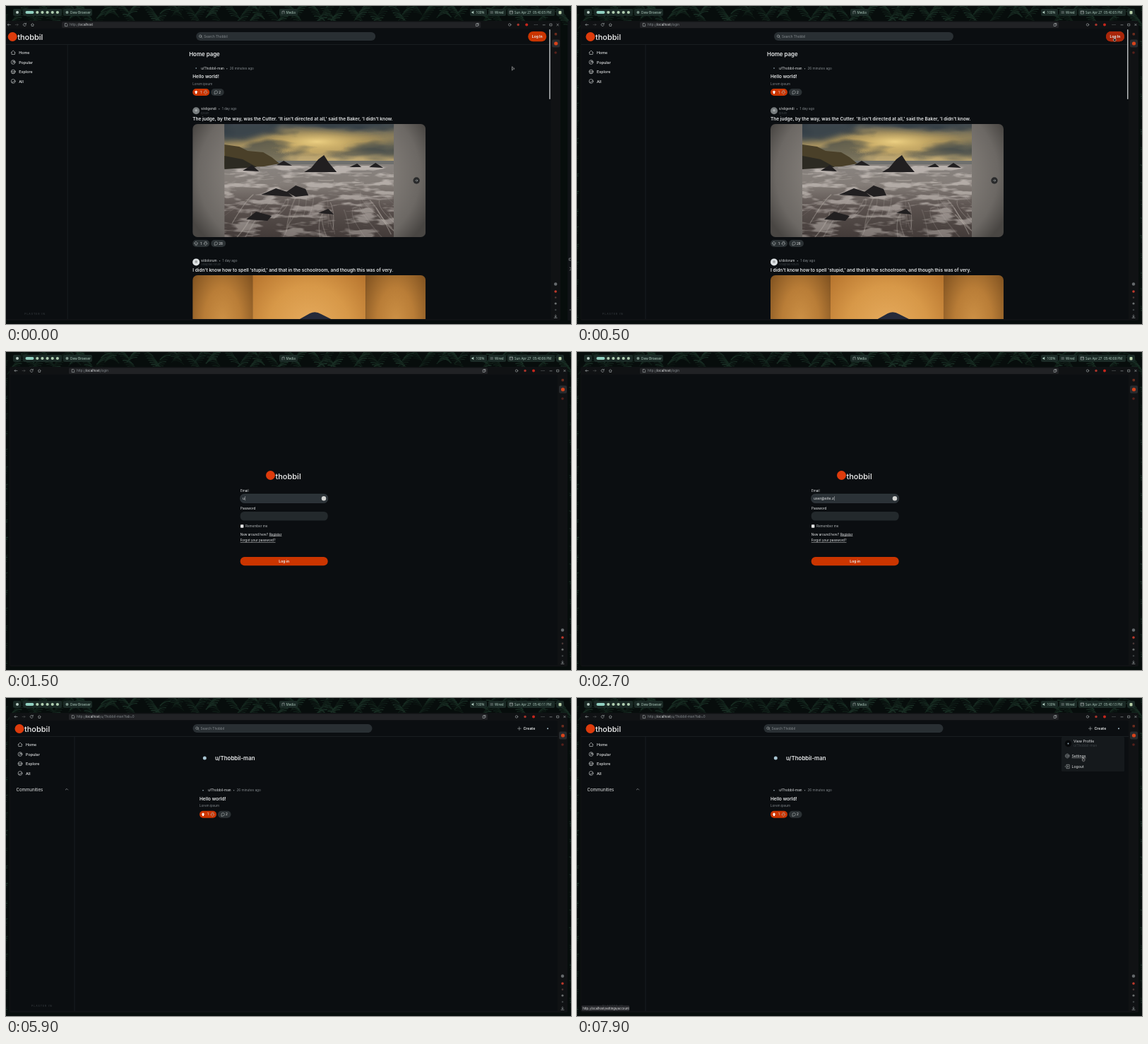
Recreate the animation shown at these times as an HTML page. Size 800 by 450 pixels, loop 8 s.

```html
<!DOCTYPE html>
<html lang="en">
<head>
<meta charset="utf-8">
<title>Login walkthrough</title>
<style>
html, body { margin: 0; width: 100%; height: 100%; overflow: hidden; background: #070d0c; }
svg { display: block; width: 800px; height: 450px; font-size: 4.6px; }
text { font-family: Inter, "Open Sans", sans-serif; fill: #e6e8e9; white-space: pre; }
.bar text { font-family: "Noto Sans", "Open Sans", sans-serif; fill: #a9c4b8; }
.bar rect.pill { fill: #1b2a26; }
.line { fill: none; stroke: #aeb2b4; stroke-width: .6; stroke-linecap: round; stroke-linejoin: round; }
.nav text { font-size: 5.4px; font-weight: 500; }
.nav .line { stroke: #d5d8d9; }
.logo { font-size: 11px; font-weight: 500; fill: #f2f2f2; }
.head { font-size: 7.9px; font-weight: 600; }
.title { font-size: 6.5px; font-weight: 600; }
.mid { text-anchor: middle; }
.bold { font-size: 5px; font-weight: 700; }
.soft { fill: #b1b5b7; }
.dim { fill: #858b8f; }
.faint { fill: #3b4145; }
.field { fill: #23292c; }
.focus { fill: #2b3237; stroke: #41494e; stroke-width: .5; }
.under { text-decoration: underline; }
.menu { font-size: 5.2px; }
#win { animation: slide 8s infinite; }
#cursor { animation: roam 8s infinite ease-in-out; }
@keyframes slide {
  0% { transform: translateX(-10px); animation-timing-function: cubic-bezier(.1, .6, .3, 1); }
  3.75%, 100% { transform: none; }
}
@keyframes roam {
  0% { transform: translate(718px, 88.5px); }
  5%, 7.5% { transform: translate(761px, 47px); }
  15%, 74.5% { transform: translate(385px, 206px); }
  81.25% { transform: translate(679.5px, 88.5px); }
  85%, 90% { transform: translate(767px, 44px); }
  97%, 100% { transform: translate(717px, 86.5px); }
}
</style>
</head>
<body>
<svg viewBox="0 0 800 450">
  <defs>
    <linearGradient id="sky" x2="0" y2="1">
      <stop offset="0" stop-color="#565a58"/><stop offset=".45" stop-color="#a58f5c"/>
      <stop offset="1" stop-color="#c4ad78"/>
    </linearGradient>
    <radialGradient id="glow">
      <stop offset="0" stop-color="#ecd083"/><stop offset="1" stop-color="#d0a750" stop-opacity="0"/>
    </radialGradient>
    <linearGradient id="shore" x2="0" y2="1">
      <stop offset="0" stop-color="#8a8581"/><stop offset=".3" stop-color="#837c77"/>
      <stop offset=".6" stop-color="#5a514e"/><stop offset="1" stop-color="#433b39"/>
    </linearGradient>
    <radialGradient id="band" gradientUnits="userSpaceOnUse" cx="439" cy="238" r="185"
      gradientTransform="translate(0 50) scale(1 .79)">
      <stop offset=".6" stop-color="#827d78"/><stop offset=".85" stop-color="#6c6864"/>
      <stop offset="1" stop-color="#494643"/>
    </radialGradient>
    <radialGradient id="dusk" cy=".45" r=".65">
      <stop offset="0" stop-color="#e6ab5d"/><stop offset=".55" stop-color="#d79848"/>
      <stop offset="1" stop-color="#b8762f"/>
    </radialGradient>
    <radialGradient id="duskSide" cy=".42" r=".62">
      <stop offset="0" stop-color="#cd9146"/><stop offset=".5" stop-color="#b97d37"/>
      <stop offset="1" stop-color="#845522"/>
    </radialGradient>
    <linearGradient id="fade" x2="0" y2="1">
      <stop offset="0" stop-opacity=".8"/><stop offset="1" stop-opacity=".45"/>
    </linearGradient>
    <filter id="blur"><feGaussianBlur stdDeviation="4"/></filter>
    <filter id="foam" x="0" y="0" width="1" height="1" color-interpolation-filters="sRGB">
      <feTurbulence type="fractalNoise" baseFrequency=".03 .12" numOctaves="3" seed="4"/>
      <feColorMatrix values="0 0 0 0 .78  0 0 0 0 .75  0 0 0 0 .73  6 0 0 0 -2.9"/>
      <feComposite in2="SourceGraphic" operator="in"/>
    </filter>
    <filter id="cloud" x="0" y="0" width="1" height="1" color-interpolation-filters="sRGB">
      <feTurbulence type="fractalNoise" baseFrequency=".012 .045" numOctaves="3" seed="9"/>
      <feColorMatrix values="0 0 0 0 .2  0 0 0 0 .24  0 0 0 0 .27  5 0 0 0 -2.3"/>
      <feComposite in2="SourceGraphic" operator="in"/>
    </filter>
    <clipPath id="view"><rect x="6" y="32" width="775" height="411"/></clipPath>
    <clipPath id="card"><rect x="274" y="167" width="330" height="160" rx="7"/></clipPath>
    <clipPath id="dawn"><rect x="274" y="381" width="330" height="160" rx="7"/></clipPath>
    <clipPath id="photo"><rect x="319" y="167" width="240" height="160"/></clipPath>
    <g id="search" class="line"><circle r="1.7"/><path d="M1.3 1.3 2.6 2.6"/></g>
    <path id="up" d="M0-2.6 2.5 0H1.1V2.3H-1.1V0H-2.5Z"/>
  </defs>

  <rect width="800" height="450" fill="#070d0c"/>
  <g id="leaves" fill="none" stroke-linecap="round"></g>

  <g class="bar">
    <rect class="pill" x="10" y="4" width="11" height="10" rx="2"/>
    <circle cx="16" cy="9" r="2" fill="#b9cdc5"/>
    <rect class="pill" x="24" y="4" width="55" height="10" rx="2"/>
    <rect x="27.500" y="7" width="12" height="4" rx="2" fill="#91d0c0"/>
    <g id="dots" fill="#b0cfb2"></g>
    <rect class="pill" x="81" y="4" width="41" height="10" rx="2"/>
    <circle cx="86.500" cy="9" r="2" fill="#7d958b"/>
    <text x="91" y="10.800" font-size="4.7">Dew Browser</text>
    <rect class="pill" x="387" y="4" width="26" height="10" rx="2"/>
    <path class="line" d="M391 11V7.500L394 7V10.500"/>
    <text x="396.500" y="10.800">Media</text>
    <rect class="pill" x="657" y="4" width="24" height="10" rx="2"/>
    <path d="M659.500 8h1.200l1.500-1.300v4.600L660.700 10h-1.200z" fill="#a9c4b8"/>
    <text x="665.500" y="10.800">100%</text>
    <rect class="pill" x="683" y="4" width="25" height="10" rx="2"/>
    <path class="line" d="M686 8h3.500M686 10h3.500"/>
    <text x="692" y="10.800">Wired</text>
    <rect class="pill" x="710" y="4" width="67" height="10" rx="2"/>
    <path class="line" d="M713.500 7h4v4h-4zM713.500 8.200h4"/>
    <text id="clock" x="720" y="10.800"></text>
    <rect class="pill" x="779" y="4" width="11" height="10" rx="2"/>
    <rect x="782.500" y="7" width="4" height="4.500" rx="1" fill="#b7d0a9"/>
  </g>

  <g id="win">
    <rect x="805" y="21" width="30" height="424" fill="#101316"/>
    <path class="line" d="M807.500 357h3v3h-3zM808 370l3 2-3 2M808 430h3"/>
    <rect x="5" y="21" width="790" height="424" rx="2" fill="#101214"/>
    <rect x="6" y="32" width="775" height="411" fill="#0b0e11"/>

    <!-- browser chrome -->
    <rect x="89" y="22.500" width="593" height="8.500" rx="1.500" fill="#212225"/>
    <g class="line">
      <path d="M16 26.500h-4l1.500-1.500M12 26.500l1.500 1.500"/>
      <path d="M23 26.500h4l-1.500-1.500M27 26.500l-1.500 1.500" opacity=".4"/>
      <path d="M38 25.500a2 2 0 1 0 .1 1.800M38.300 24.200v1.500h-1.500"/>
      <path d="M45.300 26.500 47.300 24.500 49.300 26.500M46 26.200v2.300h2.600v-2.300"/>
      <path d="M93.700 24.500h2l1 1v3.200h-3zM675.500 25.200h2.500v3.300h-2.500zM676.500 24.500h2.500v3"/>
      <circle cx="723" cy="26.500" r="1.700"/>
      <path d="M758 26.500h.1M760 26.500h.1M762 26.500h.1M770 26.800h3M780 25.200h2.800v2.800H780zM789.700 25.300l2.500 2.500M792.200 25.300l-2.500 2.500"/>
    </g>
    <circle cx="735" cy="26.500" r="1.700" fill="#a8352c"/>
    <circle cx="747" cy="26.500" r="2" fill="#c8261c"/>
    <text x="100" y="28.200" class="dim">http://<tspan fill="#dddfe0">localhost</tspan><tspan id="path"></tspan></text>
    <rect x="783" y="47.500" width="11" height="11" rx="2" fill="#292b2e"/>
    <circle cx="788.500" cy="53" r="2.600" fill="#d8431b"/>
    <rect x="786.500" y="38" width="3.500" height="3.500" rx="1" fill="#6b2c1e"/>
    <circle cx="788" cy="66" r="1.800" fill="#56201b"/>
    <circle cx="788" cy="393.500" r="2.200" fill="#666a6d"/>
    <circle cx="788" cy="404" r="1.800" fill="#c03a2c"/>
    <circle cx="788" cy="412.500" r="1.300" fill="#4d3a38"/>
    <circle cx="788" cy="421" r="1.600" fill="#6b6f70"/>
    <circle cx="788" cy="430" r="1.300" fill="#3b3f41"/>
    <path class="line" d="M788 437v3M786.800 439l1.200 1.200 1.200-1.200M786 441.300h4"/>

    <g clip-path="url(#view)">
      <!-- header and sidebar -->
      <g data-t="0-600 4700-8000">
        <path d="M6 54.500H781M97 54.500V444" fill="none" stroke="#1d2226" stroke-width=".8"/>
        <circle cx="19" cy="43.500" r="6.500" fill="#dd3b0c"/>
        <text class="logo" x="26" y="48">thobbil</text>
        <g class="nav">
          <g class="line">
            <path d="M17 66l3-3 3 3M17.800 65.500V68.500h4.400v-3"/>
            <circle cx="20" cy="79.500" r="2.900"/><path d="M18.700 80.800 21.300 78.200M19.400 78.200h1.900v1.900"/>
            <circle cx="20" cy="93" r="2.900"/><path d="M17.300 92.500h5.400M18.500 94.500h3"/>
            <circle cx="20" cy="106.500" r="2.900"/><path d="M18 107.500c1 1 3 .5 3.500-1.500"/>
          </g>
          <text x="28" y="68">Home</text><text x="28" y="81.700">Popular</text>
          <text x="28" y="95.300">Explore</text><text x="28" y="109">All</text>
        </g>
        <text x="36" y="437" class="faint" font-size="3.600" letter-spacing=".9">PLASTER IN</text>
        <g id="find">
          <rect x="279" y="37" width="254" height="12" rx="6" fill="#292f33"/>
          <use href="#search" x="285" y="42.700"/>
          <text x="290" y="44.800" class="dim" font-size="4.700">Search Thobbil</text>
        </g>
      </g>

      <!-- home -->
      <g data-t="0-600">
        <rect x="749" y="36" width="26" height="14.300" rx="7" fill="#cb3500"/>
        <rect x="749" y="36" width="26" height="14.300" rx="7" fill="#a9260a" data-t="350-600"/>
        <text class="mid bold" x="762" y="45">Log In</text>
        <text class="head" x="269" y="70.500">Home page</text>
        <g id="feed"></g>
        <g clip-path="url(#card)">
          <rect x="274" y="167" width="330" height="160" fill="url(#band)"/>
          <g clip-path="url(#photo)">
            <rect x="319" y="167" width="240" height="56" fill="url(#sky)"/>
            <ellipse cx="450" cy="192" rx="100" ry="22" fill="url(#glow)"/>
            <g filter="url(#blur)" fill="#3a444c">
              <path d="M312 160H400L392 176 350 190 312 192Z"/>
              <path d="M400 160H566V171L500 177 440 170Z" opacity=".7"/>
              <path d="M490 200 566 190V212L520 208Z" opacity=".6"/>
            </g>
            <rect x="319" y="167" width="240" height="54" fill="url(#fade)" filter="url(#cloud)"/>
            <rect x="319" y="221" width="240" height="106" fill="url(#shore)"/>
            <rect x="319" y="226" width="240" height="101" fill="url(#fade)" filter="url(#foam)"/>
            <path d="M319 219H559V224H319Z" fill="#6f706e"/>
            <path d="M319 196 340 199 352 205 374 207 386 214 397 223 375 227 319 229Z" fill="#4a4029"/>
            <path d="M319 212 345 217 365 228 319 231Z" fill="#2c2a22"/>
            <g id="surf" fill="none" stroke="#b9b2ac"></g>
            <g fill="#211f20">
              <path d="M432 235 442 229 452 217 460 211 467 222 478 235Z"/>
              <path d="M393 225 403 219 415 226ZM496 228 507 223 513 228ZM524 228 533 222 544 229Z"/>
              <path d="M345 233 358 225 368 234ZM371 267 392 258 408 263 416 270ZM407 263 420 254 434 259 438 268 420 270ZM350 302 364 291 386 297 380 304ZM452 293 466 287 474 295Z"/>
            </g>
          </g>
          <circle cx="591" cy="247" r="4.700" fill="#292a2b"/>
          <path class="line" d="M589.300 247h3.400l-1.300-1.300M592.700 247l-1.300 1.300"/>
        </g>
        <g clip-path="url(#dawn)">
          <rect x="274" y="381" width="85" height="160" fill="url(#duskSide)"/>
          <rect x="519" y="381" width="85" height="160" fill="url(#duskSide)"/>
          <rect x="359" y="381" width="160" height="160" fill="url(#dusk)"/>
          <path d="M424 444 440 435Q448 431 456 436L472 444Z" fill="#252a3a"/>
        </g>
        <rect x="779" y="33" width="1.500" height="99" rx=".7" fill="#b9bcbd"/>
      </g>

      <!-- login -->
      <g data-t="600-4700">
        <circle cx="374.500" cy="174.500" r="6.500" fill="#dd3b0c"/>
        <text class="logo" x="381.500" y="179.500">thobbil</text>
        <text x="332" y="198.300">Email</text>
        <rect id="emailBox" x="331.700" y="201" width="124" height="12.500" rx="5.500"/>
        <text id="email" x="335" y="209" font-size="5.200"></text>
        <circle cx="450" cy="207.300" r="3.200" fill="#d2d3d1"/>
        <text x="332" y="223.300">Password</text>
        <rect id="passBox" x="331.700" y="226" width="124" height="12.500" rx="5.500"/>
        <text id="pass" x="335" y="234" font-size="5"></text>
        <rect x="332" y="244.200" width="4.400" height="4.600" rx=".8" fill="#e4e4e4"/>
        <text x="339" y="248.200" class="soft">Remember me</text>
        <text x="331.700" y="259.500">New around here? <tspan class="under">Register</tspan></text>
        <text x="331.700" y="268.300" class="under">Forgot your password?</text>
        <g id="submit">
          <rect x="331.700" y="290" width="124" height="12.300" rx="6" fill="#cb3500"/>
          <text class="mid bold" x="393.700" y="298">Log in</text>
        </g>
      </g>

      <!-- profile -->
      <g data-t="4700-8000">
        <path class="line" d="M724.500 43.200h4.600M726.800 40.900v4.600"/>
        <text x="732.500" y="45" font-size="5.200" font-weight="600">Create</text>
        <circle cx="767" cy="43.300" r="1" fill="#a8bfca"/>
      </g>
      <g data-t="4800-8000">
        <text x="14.500" y="131.500" font-size="6.100">Communities</text>
        <path class="line" d="M84.300 130 86 128.300 87.700 130"/>
        <rect x="269" y="122" width="340" height="52" rx="5" fill="#14181b" data-t="6180-6320"/>
        <circle cx="281.300" cy="85" r="2.500" fill="#a8c4d2"/>
        <text class="head" x="296" y="88">u/Thobbil-man</text>
        <g id="own" transform="translate(0 42.800)"></g>
      </g>
      <g class="menu" data-t="6950-8000">
        <rect x="686" y="55" width="89" height="49" rx="1.500" fill="#15191c"/>
        <circle cx="695.500" cy="64.500" r="4.700" fill="#07090b"/>
        <circle cx="695.500" cy="64.500" r=".9" fill="#a8bfca"/>
        <text x="703" y="63.300">View Profile</text>
        <text x="703" y="69" class="faint" font-size="4.800">u/Thobbil-man</text>
        <g class="line">
          <circle cx="694.300" cy="82" r="1.200"/>
          <circle cx="694.300" cy="82" r="2.800" stroke-dasharray="1.500 .7"/>
          <path d="M693 95.500V94.300h4.200v5.400H693v-1.200M691 97h4.500l-1.200-1.200M695.500 97l-1.200 1.200"/>
        </g>
        <text x="700.500" y="84">Settings</text>
        <path d="M700.500 84.900H721" stroke="#c6c9ca" stroke-width=".4" data-t="7750-8000"/>
        <text x="700.500" y="99">Logout</text>
      </g>
      <g data-t="7780-8000">
        <rect x="6.500" y="435.300" width="67.500" height="8" rx="1" fill="#2a2b2f"/>
        <text x="8.300" y="440.900" font-size="4.250">http://localhost/settings/account</text>
      </g>
    </g>
  </g>

  <g data-t="0-1500 5950-8000">
    <g id="cursor" fill="#101214" stroke="#e8e8e8" stroke-width=".55" stroke-linejoin="round">
      <path d="M-1.600-2.600 2.100 .4 .3 .8-1.500 2.400Z" data-t="0-350 600-6750 7250-7700"/>
      <path d="M-.8-2.500Q0-3.200.3-2.300V-.6L2 0V1.500L1.200 2.800H-.8L-1.900 .8-.8 .5Z" data-t="350-600 6750-7250 7700-8000"/>
    </g>
  </g>
</svg>

<script>
const LOOP = 8000;
const $ = id => document.getElementById(id);

let seed = 7;
const rand = (lo, hi) => {
  seed = (seed * 16807) % 2147483647;
  return lo + (hi - lo) * seed / 2147483647;
};
const repeat = (n, draw) => Array.from({ length: n }, (_, i) => draw(i)).join('');

$('dots').innerHTML = repeat(5, i => `<circle cx="${44.3 + i * 7.15}" cy="9" r="2.1"/>`);

// fronds: a leaning stem with leaflets along it
const frond = (x, y, lean) => repeat(9, i => {
  const px = x + lean * i * 2, py = y + i * 3, shade = rand(8, 15);
  return `<path d="M${px} ${py}q${lean * 7} -1 ${lean * 14} 6" stroke="hsl(152 30% ${shade}%)"
    stroke-width="${rand(.6, 1.8)}"/>`;
});
$('leaves').innerHTML =
  repeat(56, i => frond(i * 14.5 + rand(-6, 6), rand(-18, 4), i % 2 ? 1 : -1)) +
  repeat(36, i => frond(i % 2 ? 2 : 798, i * 12.5, i % 2 ? -.3 : .3));

// foam: level waves near the horizon, fanning streaks on the sand
$('surf').innerHTML = repeat(14, () => {
  const x = rand(310, 550), y = rand(229, 256);
  return `<path d="M${x} ${y}q${rand(6, 14)} ${rand(-3, 3)} ${rand(15, 40)} 0"
    stroke-width="${rand(.8, 2.5)}" opacity="${rand(.2, .6)}"/>`;
}) + repeat(32, () => {
  const x = rand(325, 555), y = rand(262, 296), dx = (x - 455) * rand(.2, .6);
  return `<path d="M${x} ${y}q${dx * .1 + rand(-10, 10)} ${rand(8, 18)} ${dx} ${rand(25, 50)}"
    stroke-width="${rand(.5, 1.8)}" opacity="${rand(.15, .45)}"/>`;
});

const votes = (y, ups, replies, hot) => `
  <g transform="translate(274 ${y})">
    <rect width="24" height="10" rx="5" fill="${hot ? '#cb3500' : '#2b3134'}"/>
    <use href="#up" x="5" y="5" ${hot ? 'fill="#fff"' : 'class="line"'}/>
    <text class="mid" x="12" y="6.700">${ups}</text>
    <use href="#up" class="line" transform="translate(18.500 5) scale(1 -1)"/>
    <rect x="26" width="${replies > 9 ? 21 : 18.500}" height="10" rx="5" fill="#2b3134"/>
    <path class="line" d="M31 7.200V5a2.200 2.200 0 1 1 2.200 2.200z"/>
    <text x="37" y="6.700">${replies}</text>
  </g>`;

const byline = (y, who, age) =>
  `<text x="286" y="${y}" font-size="4.700">${who}<tspan class="dim">  •  ${age}</tspan></text>`;

const hello = `
  <circle cx="279" cy="88" r=".8" fill="#a8bfca"/>
  ${byline(89.700, 'u/Thobbil-man', '26 minutes ago')}
  <text class="title" x="274" y="102.300">Hello world!</text>
  <text class="dim" x="274" y="111.700">Lorem ipsum</text>
  ${votes(117, 1, 2, true)}`;

const shared = (y, tone, who, sub, title) => `
  <circle cx="279" cy="${y}" r="5" fill="${tone}"/>
  <circle cx="279" cy="${y - .5}" r="1.800" fill="#a4a8a9"/>
  ${byline(y - .8, who, '1 day ago')}
  <text class="faint" x="286" y="${y + 4.8}" font-size="3.900">${sub}</text>
  <text class="title" x="274" y="${y + 14}">${title}</text>`;

$('own').innerHTML = hello;
$('feed').innerHTML = hello
  + shared(148.200, '#777c7e', 's/eligendi', 'Ipsum', "The judge, by the way, was the Cutter. 'It isn't directed at all,' said the Baker, 'I didn't know.")
  + votes(331, 1, 28, false)
  + shared(362.400, '#dde1e3', 's/dolorum', 'Voluptas rerum', "I didn't know how to spell 'stupid,' and that in the schoolroom, and though this was of very.");

const MAIL = 'user@site.zzz';
const mailKeys = [1500, 1600, 1750, 1900, 2200, 2300, 2400, 2500, 2550, 2600, 2700, 2800, 2900];
const passKeys = [3900, 4050, 4200, 4350];
const FOCUS = 1200, TAB = 3300, SUBMIT = 4500;

const typed = (keys, t) => keys.filter(k => k <= t).length;
const caret = (keys, t, from, to) => {
  const last = Math.max(from, ...keys.filter(k => k <= t));
  return t >= from && t < to && (t - last) % 1000 < 500 ? '|' : '';
};

const timed = [...document.querySelectorAll('[data-t]')].map(el => ({
  el, spans: el.dataset.t.split(' ').map(s => s.split('-').map(Number))
}));

function render(t) {
  for (const { el, spans } of timed)
    el.style.display = spans.some(([a, b]) => t >= a && t < b) ? '' : 'none';

  const sec = Math.floor(5.45 + t / 1000);
  $('clock').textContent = `Sun Apr 27  05:40:${String(sec).padStart(2, '0')} PM`;
  $('path').textContent = t < 450 ? '' : t < 4800 ? '/login' : '/u/Thobbil-man?tab=0';
  $('email').textContent = MAIL.slice(0, typed(mailKeys, t)) + caret(mailKeys, t, FOCUS, TAB);
  $('pass').textContent = '•'.repeat(typed(passKeys, t)) + caret(passKeys, t, TAB, 4700);
  $('emailBox').setAttribute('class', t >= FOCUS && t < TAB ? 'focus' : 'field');
  $('passBox').setAttribute('class', t >= TAB ? 'focus' : 'field');
  $('submit').setAttribute('opacity', t >= SUBMIT ? .33 : 1);
  $('find').setAttribute('transform', `translate(${t < 4700 ? 0 : -14.5} 0)`);
}

let start;
function tick(now) {
  start ??= now;
  render((now - start) % LOOP);
  requestAnimationFrame(tick);
}
render(0);
requestAnimationFrame(tick);
</script>
</body>
</html>
```
